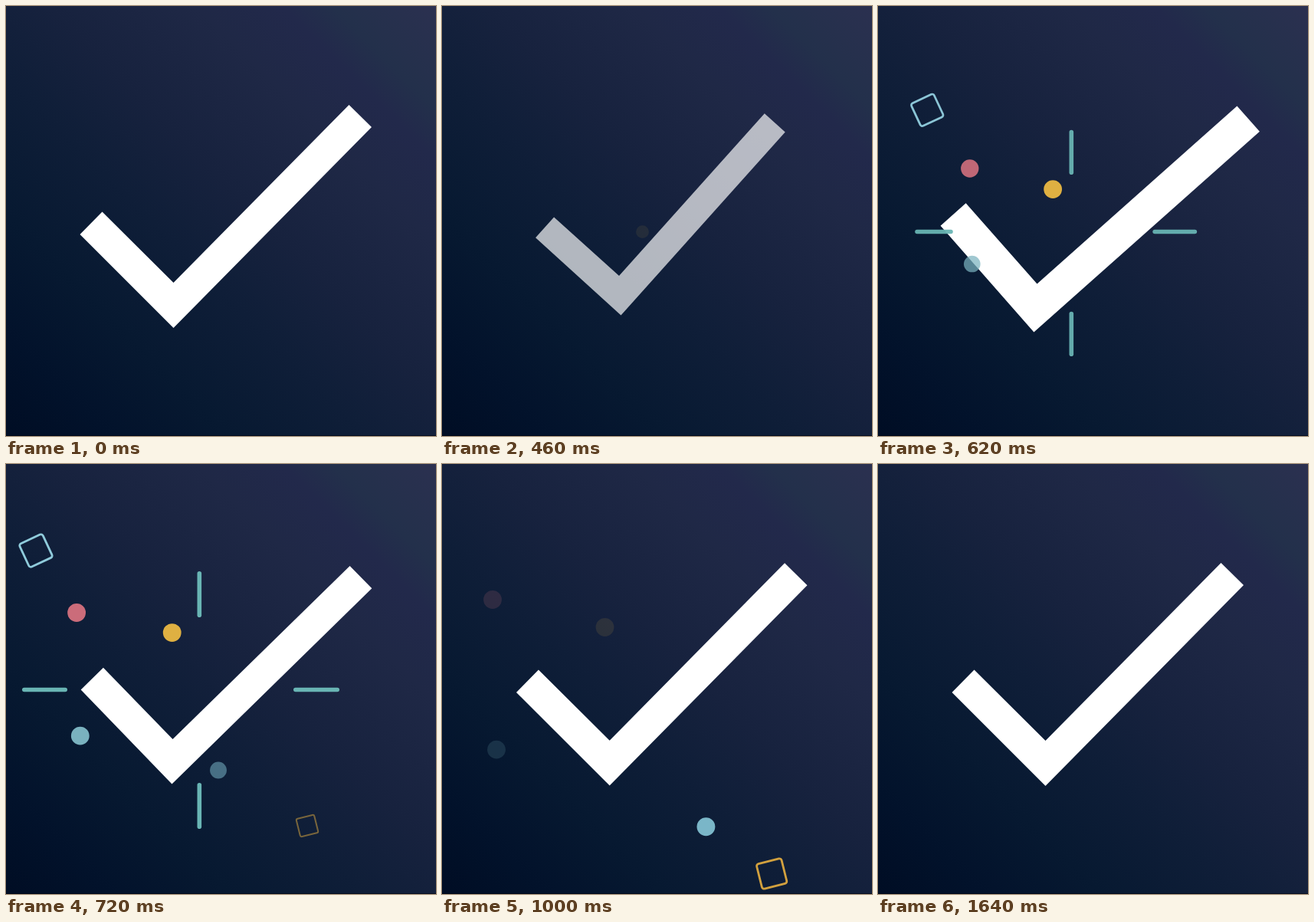
Write an HTML page with a canvas that moves like this. It is 561 px wide and 561 px high and loops after 1760 ms.

```html
<!DOCTYPE html>
<html lang="en">
<head>
<meta charset="utf-8">
<title>Check mark</title>
<style>
  html, body { margin: 0; width: 100%; height: 100%; overflow: hidden; background: #14203c; }
  canvas { display: block; width: 100vw; height: 100vh; }
</style>
</head>
<body>
<canvas id="stage" width="561" height="561"></canvas>
<script>
const ctx = document.getElementById('stage').getContext('2d');
const SIZE = 561, LOOP = 1760;
const BIRTH = 280;            // the finished mark is cut away here
const PIVOT = [286, 270];
const MARK = [[96.5, 298], [125.5, 268.5], [218.5, 361], [447.5, 129], [477, 158], [218.5, 420]];

const clamp = x => Math.min(1, Math.max(0, x));
const ramp = (t, a, b) => clamp((t - a) / (b - a));
const smooth = u => u * u * (3 - 2 * u);
const mix = (a, b, u) => a + (b - a) * u;

// Eased track through [time, value] keys
function track(keys, t) {
  if (t <= keys[0][0]) return keys[0][1];
  for (let i = 1; i < keys.length; i++) {
    const [a, from] = keys[i - 1], [b, to] = keys[i];
    if (t < b) return mix(from, to, smooth(ramp(t, a, b)));
  }
  return keys[keys.length - 1][1];
}

const SCALE = [[310, 0.5], [565, 1.09], [790, 0.962], [1040, 1]];
const TURN = [[310, -15], [565, 4.4], [790, 0]];

const backdrop = ctx.createLinearGradient(0, SIZE, SIZE, 0);
[[0, '#000d24'], [0.12, '#02122b'], [0.26, '#071931'], [0.42, '#0f1e38'], [0.55, '#17223e'],
 [0.72, '#1f2846'], [0.82, '#22294b'], [0.88, '#23304b'], [1, '#2b3050']]
  .forEach(([at, color]) => backdrop.addColorStop(at, color));

// "from" at time t0 slows down into "to" at time t1
const PARTS = [
  { color: '#cb6c7a', t0: 540, t1: 950, from: [149, 231], to: [66, 177], show: 465, hide: 830 },
  { color: '#dfb042', t0: 540, t1: 828, from: [242.5, 263], to: [212.5, 213], show: 445, hide: 820 },
  { color: '#7ab2bf', t0: 540, t1: 960, from: [150, 317.5], to: [71, 372.7], show: 502, hide: 830 },
  { color: '#86c8d8', t0: 720, t1: 1050, from: [277, 399.5], to: [346, 475], show: 640, hide: 980, small: 0.84 },
  { color: '#8fcbdb', t0: 540, t1: 834, from: [95.5, 164], to: [29, 104], show: 460, hide: 780, tilt: -25 },
  { color: '#e8b040', t0: 720, t1: 977, from: [393, 472], to: [430.2, 534.5], show: 640, hide: 980, tilt: -14, small: 0.46 }
];

// Ray ends [inner, outer] along one axis at the three times
const RAY_TIMES = [540, 720, 860];
const RAYS = [
  { axis: 'y', ends: [[236, 179], [200, 140], [157, 112]] },
  { axis: 'y', ends: [[385, 442], [416, 476], [444, 488]] },
  { axis: 'x', ends: [[112, 70], [80, 21], [53, 9]] },
  { axis: 'x', ends: [[345, 401], [375, 435], [403, 447]] }
];

function drawMark(t) {
  const live = t >= BIRTH;
  const grow = smooth(ramp(t, 310, 565));
  ctx.save();
  if (live) {
    ctx.globalAlpha = clamp(grow * 1.08);
    ctx.translate(...PIVOT);
    ctx.rotate(track(TURN, t) * Math.PI / 180);
    const s = track(SCALE, t);
    ctx.scale(s, s);
    ctx.translate(-PIVOT[0], -PIVOT[1]);
  }
  ctx.beginPath();
  MARK.forEach(p => ctx.lineTo(...p));
  ctx.closePath();
  ctx.fillStyle = '#fff';
  ctx.fill();
  ctx.restore();
}

function drawRays(t) {
  const alpha = ramp(t, 460, 630) * (1 - ramp(t, 800, 965));
  if (!alpha) return;
  const i = t < RAY_TIMES[1] ? 0 : 1;
  const u = (t - RAY_TIMES[i]) / (RAY_TIMES[i + 1] - RAY_TIMES[i]);
  ctx.save();
  ctx.globalAlpha = alpha;
  ctx.fillStyle = '#69b5b4';
  for (const { axis, ends } of RAYS) {
    const a = mix(ends[i][0], ends[i + 1][0], u);
    const b = mix(ends[i][1], ends[i + 1][1], u);
    const start = Math.min(a, b), len = Math.abs(b - a);
    ctx.beginPath();
    if (axis === 'x') ctx.roundRect(start, 291.7, len, 5.6, 2.8);
    else ctx.roundRect(249.5, start, 5.6, len, 2.8);
    ctx.fill();
  }
  ctx.restore();
}

function drawPart(p, t) {
  const shown = ramp(t, p.show, p.show + 165);
  const alpha = shown * (1 - ramp(t, p.hide, p.hide + 205));
  if (!alpha) return;
  const w = Math.max(0, (p.t1 - t) / (p.t1 - p.t0)) ** 2;
  const square = p.tilt !== undefined;
  const s = mix(p.small || (square ? 0.28 : 0.68), 1, shown);
  ctx.save();
  ctx.globalAlpha = alpha;
  ctx.translate(mix(p.to[0], p.from[0], w), mix(p.to[1], p.from[1], w));
  ctx.scale(s, s);
  ctx.beginPath();
  if (square) {
    ctx.rotate(p.tilt * Math.PI / 180);
    ctx.roundRect(-16.7, -16.7, 33.4, 33.4, 3);
    ctx.lineWidth = 2.8;
    ctx.strokeStyle = p.color;
    ctx.stroke();
  } else {
    ctx.arc(0, 0, 11.9, 0, Math.PI * 2);
    ctx.fillStyle = p.color;
    ctx.fill();
  }
  ctx.restore();
}

function draw(t) {
  ctx.fillStyle = backdrop;
  ctx.fillRect(0, 0, SIZE, SIZE);
  ctx.fillStyle = 'rgba(0, 4, 16, 0.6)';
  ctx.fillRect(0, SIZE - 1, SIZE, 1);
  drawMark(t);
  drawRays(t);
  PARTS.forEach(p => drawPart(p, t));
}

const begin = performance.now();
function tick() {
  const t = (performance.now() - begin) % LOOP;
  draw(Math.floor(t / 20) * 20);
  requestAnimationFrame(tick);
}
tick();
</script>
</body>
</html>
```
